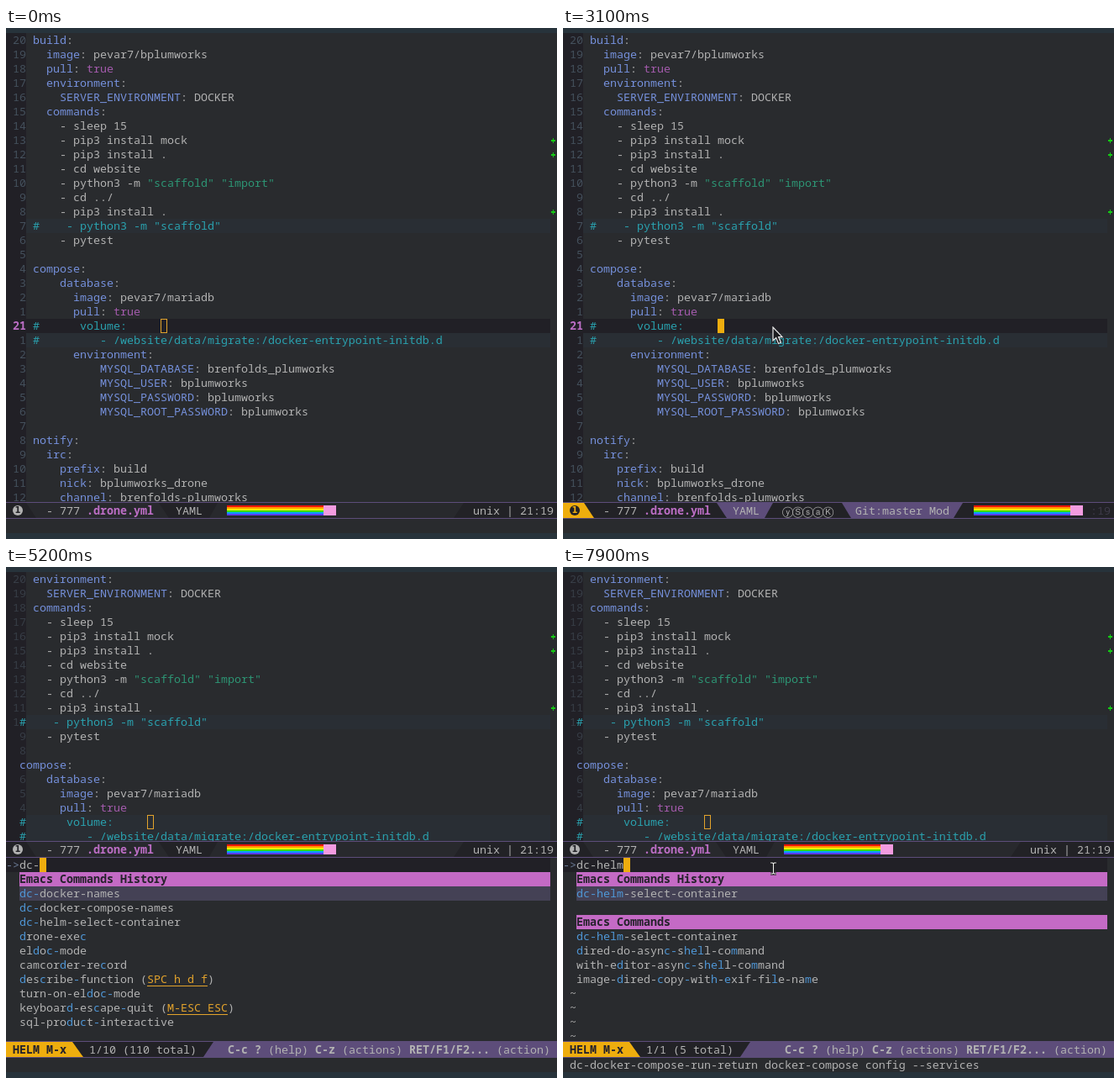
Write an HTML page that moves like this. It is 656 px wide and 608 px high and loops after 8 s.

```html
<!DOCTYPE html>
<html lang="en">
<head>
<meta charset="utf-8">
<title>Editor session</title>
<style>
html, body { margin: 0; width: 100%; height: 100%; overflow: hidden; background: #27333b; }
#stage { position: absolute; left: 0; top: 0; width: 656px; height: 608px; overflow: hidden;
  color: #b2b2b2; font: 13.333px/17px "Noto Sans Mono", "DejaVu Sans Mono", monospace; }
#stage div, #stage svg { position: absolute; }
.t { white-space: pre; height: 17px; }
.pane { left: 0; width: 656px; overflow: hidden; background: #292b2e; }
.num { color: #44505c; }
.dim { color: #373d46; }
.now { color: #bc6ec5; font-weight: 700; }
.key { color: #7590db; }
.str { color: #2d9574; }
.val { color: #a45bad; }
.com { color: #2aa1ae; }
.hit { color: #4f97d7; }
.bind { color: #e3a32c; text-decoration: underline; text-underline-offset: 3px; }
.name { color: #bc6ec5; font-weight: 700; }
.bold { font-weight: 700; }
.dark { color: #25222b; font-weight: 700; }
.faint { color: #3d3a48; }
.prompt { color: #6c7c98; }
.ring { font: 13px/17px "DejaVu Sans", sans-serif; }
.badge { width: 12px; height: 12px; border-radius: 6px; font: 700 10px/12px "DejaVu Sans", sans-serif; text-align: center; }
.bar { left: 0; width: 656px; height: 20px; background: #222226; }
.bar::after { content: ""; position: absolute; inset: 0; border: solid #5d4d7a; border-width: 1px 0; }
</style>
</head>
<body>
<div id="stage"></div>
<script>
const LOOP = 8000, ROW = 17, TOP = 6;
const stage = document.getElementById('stage');
const PURPLE = '#5d4d7a', GOLD = '#eead0e', INK = '#222226';

const source = `build:
  image: pevar7/bplumworks
  pull: true
  environment:
    SERVER_ENVIRONMENT: DOCKER
  commands:
    - sleep 15
    - pip3 install mock
    - pip3 install .
    - cd website
    - python3 -m "scaffold" "import"
    - cd ../
    - pip3 install .
#    - python3 -m "scaffold"
    - pytest

compose:
    database:
      image: pevar7/mariadb
      pull: true
#      volume:
#         - /website/data/migrate:/docker-entrypoint-initdb.d
      environment:
          MYSQL_DATABASE: brenfolds_plumworks
          MYSQL_USER: bplumworks
          MYSQL_PASSWORD: bplumworks
          MYSQL_ROOT_PASSWORD: bplumworks

notify:
  irc:
    prefix: build
    nick: bplumworks_drone
    channel: brenfolds-plumworks`.split('\n');
const CURRENT = 20, ADDED = [7, 8, 12];

const HISTORY = '#Emacs Commands History', COMMANDS = '#Emacs Commands';
const lists = {
  all: [HISTORY, 'dc-helm-select-container', 'dc-docker-names', 'lisp-mode', 'camcorder-record',
    'dc-docker-compose-names', 'ert-run-tests-interactively', 'package-list-packages',
    'package-install-file', 'drone-exec', 'messages-buffer-mode', 'toggle-truncate-lines'],
  dc: [HISTORY, 'dc-docker-names', 'dc-docker-compose-names', 'dc-helm-select-container', 'drone-exec',
    'eldoc-mode', 'camcorder-record', 'describe-function (SPC h d f)', 'turn-on-eldoc-mode',
    'keyboard-escape-quit (M-ESC ESC)', 'sql-product-interactive'],
  dch: [HISTORY, 'dc-helm-select-container', '', COMMANDS, 'dc-helm-select-container',
    'eudc-edit-hotlist', 'eudc-get-phone', 'vc-default-check-headers', 'Info-toggle-breadcrumbs-in-header',
    'Info-toggle-breadcrumbs-in-header-line', 'dynamic-setting-handle-config-changed-event', 'decode-hz-region'],
  helm: [HISTORY, 'dc-helm-select-container', '', COMMANDS, 'dc-helm-select-container',
    'display-local-help (C-c ! H)', 'ido-completion-help', 'org-speed-command-help',
    'dired-do-async-shell-command', 'with-editor-async-shell-command',
    'Info-toggle-breadcrumbs-in-header-line', 'docker-container-shell'],
  last: [HISTORY, 'dc-helm-select-container', '', COMMANDS, 'dc-helm-select-container',
    'dired-do-async-shell-command', 'with-editor-async-shell-command',
    'image-dired-copy-with-exif-file-name', '~', '~', '~', '~']
};

// start time, typed input, list, counter
const steps = [
  [3200, '', 'all', '1/43 (141 total)'],
  [4400, 'd', 'all', '1/43 (141 total)'],
  [4600, 'dc', 'all', '1/43 (141 total)'],
  [4900, 'dc-', 'dc', '1/10 (110 total)'],
  [5700, 'dc-h', 'dch', '1/1 (101 total)'],
  [6200, 'dc-he', 'dch', '1/1 (101 total)'],
  [6400, 'dc-hel', 'helm', '1/1 (13 total)'],
  [6600, 'dc-helm', 'helm', '1/1 (13 total)'],
  [7500, 'dc-helm', 'last', '1/1 (5 total)']
];
const ACTIVE_AT = 1400, POINTER_AT = 1800, HELM_AT = 3200, TYPE_AT = 4400, ECHO_AT = 7500;

function box(parent, x, y, w, h, background, cls = '') {
  const el = document.createElement('div');
  el.className = cls;
  Object.assign(el.style, { left: x + 'px', top: y + 'px', background });
  if (w) el.style.width = w + 'px';
  if (h) el.style.height = h + 'px';
  parent.append(el);
  return el;
}

function pane(parent, y, h) {
  return box(parent, 0, y, 656, h, '', 'pane');
}

// parts: a string or a list of [string, class]
function text(parent, x, y, parts, cls = '') {
  const el = box(parent, x, y, 0, 0, '', 't ' + cls);
  if (typeof parts === 'string') el.textContent = parts;
  else for (const [str, c] of parts) {
    const span = document.createElement('span');
    span.textContent = str;
    span.className = c;
    el.append(span);
  }
  return el;
}

function svg(parent, x, y, w, h, body) {
  const el = document.createElementNS('http://www.w3.org/2000/svg', 'svg');
  el.setAttribute('width', w);
  el.setAttribute('height', h);
  Object.assign(el.style, { left: x + 'px', top: y + 'px' });
  el.innerHTML = body;
  parent.append(el);
  return el;
}

// a mode line section whose sides are soft slanted waves
function section([l0, l1, r0, r1, color]) {
  return `<path fill="${color}" d="M${l0} 1C${l0 + (l1 - l0) * .4} 8 ${l0 + (l1 - l0) * .6} 12 ${l1} 19H${r1}` +
    `C${r0 + (r1 - r0) * .6} 12 ${r0 + (r1 - r0) * .4} 8 ${r0} 1Z"/>`;
}

function modeLine(parent, y, sections) {
  const bar = box(parent, 0, y, 0, 0, '', 'bar');
  svg(bar, 0, 0, 656, 20, sections.map(section).join(''));
  return bar;
}

function badge(bar, back, ink) {
  box(bar, 8, 4, 0, 0, back, 'badge').append('1');
  bar.lastChild.style.color = ink;
}

function progress(bar, x) {
  const colors = ['#f01408', '#ff9a00', '#ffee00', '#36e010', '#0a9cff', '#5b3cf0'];
  const stops = colors.map((c, i) => `${c} ${i * 2}px ${i * 2 + 2}px`).join();
  box(bar, x, 4, 115, 12, `linear-gradient(${stops})`);
  box(bar, x + 115, 4, 15, 12, '#f39be0');
}

function fileName(bar) {
  text(bar, 48, 2, [['- 777 ', ''], ['.drone.yml', 'name']]);
  text(bar, 202, 2, 'YAML');
}

function idleLine(parent, y) {
  const soft = '#28292d';
  const bar = modeLine(parent, y, [[24, 36, 182, 194, soft], [252, 242, 545, 533, soft]]);
  badge(bar, '#b2b2b2', INK);
  fileName(bar);
  progress(bar, 263);
  text(bar, 556, 2, 'unix | 21:19');
  return bar;
}

function activeLine(parent, y) {
  const bar = modeLine(parent, y, [[0, 0, 25, 37, GOLD], [183, 195, 250, 240, PURPLE], [332, 343, 476, 465, PURPLE]]);
  badge(bar, INK, GOLD);
  fileName(bar);
  [...'ⓨⓈⓢⓐⓀ'].forEach((c, i) => text(bar, 261 + 12 * i, 2, c, 'ring'));
  text(bar, 348, 2, 'Git:master Mod');
  progress(bar, 489);
  text(bar, 628, 2, ':19', 'faint');
  return bar;
}

function paint(line) {
  if (line[0] === '#') return [[line, 'com']];
  return line.split(/(".*?"|\w+(?=:)|\btrue\b)/).map((part, i) =>
    [part, i % 2 === 0 ? '' : part[0] === '"' ? 'str' : part === 'true' ? 'val' : 'key']);
}

function addMark(parent, y) {
  box(parent, 649, y + 8, 5, 1.5, '#14cc14');
  box(parent, 650.75, y + 6, 1.5, 5.5, '#14cc14');
}

function buffer(parent, first, count, x, focused) {
  for (let i = 0; i < count; i++) {
    const n = first + i, y = i * ROW, line = source[n];
    const here = focused && n === CURRENT;
    if (here) box(parent, 24, y, 624, ROW, '#212026');
    else if (line[0] === '#') box(parent, 24, y, 624, ROW, '#292e34');
    const label = String(Math.abs(i - CURRENT) || 21).padStart(2);
    if (focused) text(parent, 8, y, label, here ? 'now' : 'num');
    else if (line[0] === '#') text(parent, 8, y, i === 10 ? '1' : '', 'dim');
    else if (i !== 13) text(parent, 8, y, label, 'dim');
    text(parent, x, y, paint(line));
    if (ADDED.includes(n)) addMark(parent, y);
  }
}

function hollow(parent, x, y) {
  const el = box(parent, x, y, 6, 15, '');
  el.style.border = '1px solid #e3a32c';
  return el;
}

// marks the typed letters in order, and key bindings in parentheses
function candidate(str, typed) {
  const [, name, open, keys, close] = str.match(/^([^(]*)(\(?)([^)]*)(\)?)$/);
  const hits = new Set();
  let from = 0;
  for (const c of typed) {
    const at = name.indexOf(c, from);
    if (at >= 0) { hits.add(at); from = at + 1; }
  }
  const parts = [...name].map((c, i) => [c, hits.has(i) ? 'hit' : '']);
  return [...parts, [open, ''], [keys, 'bind'], [close, '']];
}

function helm(parent, [, typed, list, counter]) {
  parent.replaceChildren();
  const view = pane(parent, 0, 218);
  box(view, 0, 0, 648, ROW, '#212026');
  text(view, 0, 0, [['->', 'prompt'], [typed, '']]);
  box(view, 16 + 8 * typed.length, 0, 8, ROW, GOLD);
  lists[list].forEach((item, i) => {
    const y = (i + 1) * ROW;
    if (item[0] === '#') {
      box(view, 16, y, 632, ROW, '#c46ac5');
      text(view, 16, y, item.slice(1), 'dark');
    } else if (item === '~') {
      text(view, 8, y, item);
    } else {
      if (i === 1) box(view, 16, y, 632, ROW, '#444155');
      text(view, 16, y, candidate(item, typed));
    }
  });
  const edge = 107 + 8 * counter.length;
  const bar = modeLine(parent, 218, [[0, 0, 79, 92, GOLD], [edge + 12, edge, 656, 656, PURPLE]]);
  text(bar, 8, 2, 'HELM M-x', 'dark');
  text(bar, 99, 2, counter);
  text(bar, 264, 2, [['C-c ?', 'bold'], [' (help) ', ''], ['C-z', 'bold'], [' (actions) ', ''],
    ['RET/F1/F2...', 'bold'], [' (action)', '']]);
}

const show = (el, on) => { el.style.visibility = on ? 'inherit' : 'hidden'; };

// whole window
const full = pane(stage, TOP, 578);
box(full, 0, 0, 24, 558, '#212026');
buffer(full, 0, source.length, 32, true);
const idleCursor = hollow(full, 184, CURRENT * ROW);
const cursor = box(full, 184, CURRENT * ROW, 8, ROW, GOLD);
const idleBar = idleLine(full, 558);
const activeBar = activeLine(full, 558);

// split window with completion list
const split = pane(stage, TOP, 578);
const upper = pane(split, 0, 320);
box(upper, 0, 0, 24, 320, '#212026');
buffer(upper, 3, 19, 16, false);
hollow(upper, 168, 17 * ROW);
idleLine(split, 320);
const lower = pane(split, 340, 238);

const echo = pane(stage, 584, 17);
const message = text(echo, 8, 0, 'dc-docker-compose-run-return docker-compose config --services');

const arrow = svg(stage, 249, 355, 14, 23,
  '<path d="M1 1V17L4.7 13.6L7.6 20.5L10.4 19.3L7.6 12.6H12Z" fill="#1c1c1f" stroke="#e8e8e8" stroke-width="1.2"/>');
const beam = svg(stage, 245, 350, 11, 17,
  '<path d="M2 2H4.5L5.5 3L6.5 2H9M5.5 3V14M2 15H4.5L5.5 14L6.5 15H9" fill="none" stroke="#111" stroke-width="3"/>' +
  '<path d="M2 2H4.5L5.5 3L6.5 2H9M5.5 3V14M2 15H4.5L5.5 14L6.5 15H9" fill="none" stroke="#eee" stroke-width="1.2"/>');

let drawn;
function draw(t) {
  const active = t >= ACTIVE_AT, open = t >= HELM_AT;
  show(full, !open);
  show(split, open);
  show(cursor, active);
  show(activeBar, active);
  show(idleCursor, !active);
  show(idleBar, !active);
  show(arrow, t >= POINTER_AT && t < TYPE_AT);
  show(beam, t >= ECHO_AT);
  show(message, t >= ECHO_AT);
  const step = steps.filter(s => s[0] <= t).pop();
  if (step && step !== drawn) helm(lower, step);
  drawn = step;
}

const start = performance.now();
function tick() {
  draw((performance.now() - start) % LOOP);
  requestAnimationFrame(tick);
}
tick();
</script>
</body>
</html>
```
